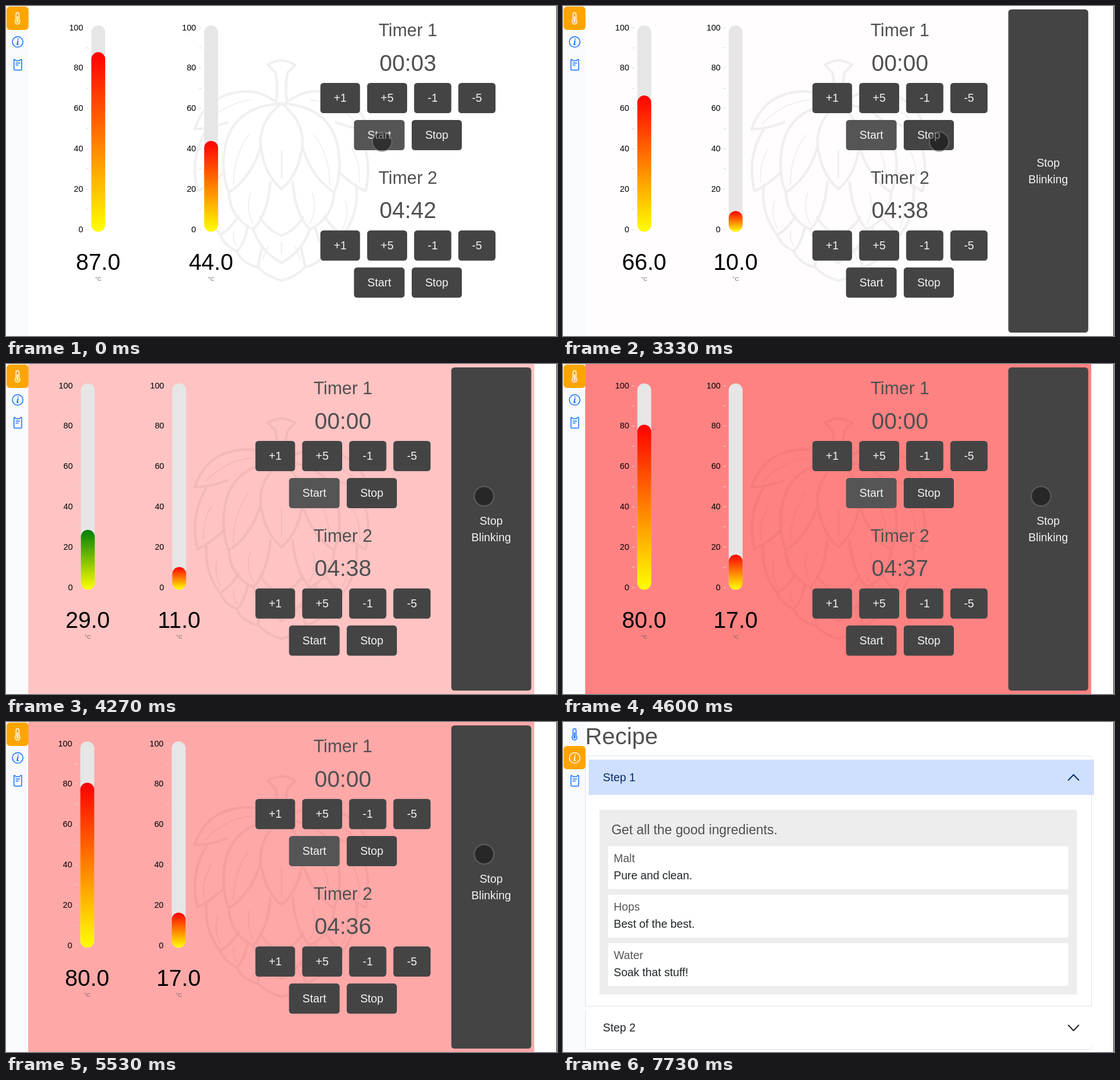
An HTML page for the animation above (8000 ms loop, 967x579 px).

```html
<!DOCTYPE html>
<html lang="en">
<head>
<meta charset="utf-8">
<title>Brewing dashboard</title>
<style>
  html, body { margin: 0; width: 100%; height: 100%; overflow: hidden; background: #fff; }
  svg { display: block; width: 967px; height: 579px; font-family: "Liberation Sans", Arial, sans-serif; }
</style>
</head>
<body>
<svg id="stage" viewBox="0 0 967 579">
  <defs>
    <linearGradient id="hot" x2="0" y2="1"><stop stop-color="#f00"/><stop offset="1" stop-color="#ff0"/></linearGradient>
    <linearGradient id="cool" x2="0" y2="1"><stop stop-color="#008000"/><stop offset="1" stop-color="#ff0"/></linearGradient>
    <g id="hopHalf" fill="none" stroke="#000" stroke-linecap="round" stroke-linejoin="round">
      <g stroke-width="4.5">
        <path d="M483.5 95.500Q471 96 459.500 103.500L473 117Q478 140 474 168"/>
        <path d="M470 166Q445 148 418 150Q352 154 331 216Q360 216 388 204"/>
        <path d="M483.500 171Q400 176 385 245Q376 292 391 327Q430 302 447 247"/>
        <path d="M352 217Q322 265 336 325Q364 311 383 291"/>
        <path d="M483.500 171Q443 202 447 247Q454 297 483.500 321"/>
        <path d="M352 315Q347 365 376 402Q394 391 408 369"/>
        <path d="M391 327Q393 372 434 392Q459 366 464 309"/>
        <path d="M434 392Q446 429 483.500 451"/>
        <path d="M446 371Q458 392 483.500 403"/>
        <path d="M376 402Q384 421 405 430Q417 420 424 389"/>
        <path d="M405 430Q414 452 442 458L449 423"/>
        <path d="M442 458Q458 475 483.500 482"/>
      </g>
      <path stroke-width="2" d="M349 207Q388 168 432 165M347 309Q344 279 360 250M399 313Q399 263 426 226M376 390Q364 366 371 343M434 382Q420 358 429 329M405 421Q397 409 400 395M483.500 302V254M483.500 436V416M451 445Q453 434 461 421"/>
    </g>
  </defs>
  <rect width="967" height="579" fill="#fff"/>
  <g id="dashboard">
    <rect id="flash" x="39" width="888" height="579"/>
    <g id="hop"><use href="#hopHalf"/><use href="#hopHalf" transform="matrix(-1 0 0 1 967 0)"/></g>
    <g id="gauges"></g>
    <g id="timers"></g>
    <g id="alarm"></g>
  </g>
  <g id="recipe"></g>
  <g id="sidebar">
    <rect width="39" height="579" fill="#f8fafd"/>
    <rect id="pill" x="1" width="38.500" height="41" rx="6" fill="#ffa500"/>
    <g fill="none" stroke-width="1.500" stroke-linecap="round" stroke-linejoin="round">
      <g id="thermoIcon">
        <path d="M17.500 24V14.500a2.700 2.700 0 0 1 5.400 0V24a4.300 4.300 0 1 1-5.400 0Z"/>
        <path stroke-width="2" d="M20.200 19v7"/><circle cx="20.200" cy="27" r="1.300"/>
      </g>
      <g id="infoIcon">
        <circle cx="20.500" cy="63" r="9.300"/>
        <path stroke-width="2" d="M20.900 61l-1.300 6.500h1.700M21.200 57.800v.2"/>
      </g>
      <path stroke="#0d6efd" d="M14 94.500q0-1 1-1l2.500 2.500h6l2.500-2.500q1.500 0 1.500 1V111q0 1.500-1.500 1.500H15.500Q14 112.500 14 111ZM17.500 100h6.500M17.500 103.500h4"/>
    </g>
  </g>
  <path d="M966.500 0V579" stroke="#222"/>
  <circle id="cursor" r="17" fill="#000" fill-opacity=".43" stroke="#888" stroke-opacity=".4" stroke-width="2.500"/>
</svg>
<script>
const LOOP = 8000, STEP = 200 / 3;
const ALARM_ON = 3330, ALARM_OFF = 6070, PRESS = 5930, LEAVE = 7330;
const BLUE = '#0d6efd', DARK = '#444', LIT = '#555', INK = '#505050';
const TICKS = [270, 1270, 2200, 3330, 4330, 5330, 6330, 7330];
// time, left value, right value, left fill, right fill
const READINGS = [
  [0, 87, 44, 'hot', 'hot'], [470, 74, 6, 'hot', 'hot'],
  [1470, 71, 8, 'hot', 'hot'], [2470, 66, 10, 'hot', 'hot'],
  [3530, 29, 11, 'cool', 'hot'], [4530, 80, 17, 'hot', 'hot'],
  [5600, 43, 91, 'cool', 'cool'], [6600, 58, 73, 'cool', 'hot']
];
const BLINK = [[3330, 0], [4267, .883], [4933, 1.606], [5533, 2.17], [6000, 2.62]];
const PATH = [[0, 660, 238], [3530, 660, 238], [4130, 839, 232], [6270, 839, 232], [7070, 18, 69]];

const $ = id => document.getElementById(id);

function add(parent, tag, attrs, content) {
  const el = document.createElementNS('http://www.w3.org/2000/svg', tag);
  set(el, attrs);
  if (content) el.textContent = content;
  return parent.appendChild(el);
}
function set(el, attrs) {
  for (const k in attrs) el.setAttribute(k, attrs[k]);
}
const box = (p, x, y, width, height, fill, rx = 0) => add(p, 'rect', { x, y, width, height, fill, rx });
const label = (p, x, y, size, fill, content, anchor = 'middle') =>
  add(p, 'text', { x, y, 'font-size': size, fill, 'text-anchor': anchor }, content);

function makeGauge() {
  const g = add($('gauges'), 'g', {});
  for (let v = 0; v <= 100; v += 10) {
    const y = 391.5 - v * 3.54;
    add(g, 'path', { d: `M-21.500 ${Math.round(y) + .5}h4.500`, stroke: '#d8d8d8' });
    if (v % 20 === 0) label(g, -26.5, y + 5, 14.7, '#000', String(v), 'end');
  }
  box(g, -12.2, 34, 24.4, 362, '#e6e6e6', 12.2);
  const bar = box(g, -12.2, 0, 24.4, 0, '', 12.2);
  const value = label(g, -.2, 462.5, 40, '#000');
  label(g, 0, 481.5, 9.8, '#666', '°C');
  return { g, bar, value };
}

function makeButton(parent, x, y, width, text) {
  const rect = box(parent, x, y, width, 53, DARK, 5.5);
  label(parent, x + width / 2, y + 33, 19.8, '#f4f4f4', text);
  return rect;
}

function makeTimer(name, top) {
  const g = add($('timers'), 'g', { transform: `translate(0 ${top})` });
  label(g, 705.3, 53, 30.8, INK, name);
  const clock = label(g, 705.3, 113.5, 39.8, INK);
  makeButton(g, 551.7, 135, 69.6, '+1');
  makeButton(g, 633.8, 135, 70.2, '+5');
  makeButton(g, 716.2, 135, 65.3, '-1');
  makeButton(g, 793.8, 135, 65.3, '-5');
  const start = makeButton(g, 610.7, 200, 88.8, 'Start');
  makeButton(g, 712, 200, 88, 'Stop');
  return { clock, start };
}

function makeRecipe() {
  const g = $('recipe');
  const line = (d, stroke = '#dee2e6', w = 1) =>
    add(g, 'path', { d, stroke, fill: 'none', 'stroke-width': w, 'stroke-linecap': w > 1 ? 'round' : 'butt', 'stroke-linejoin': 'round' });
  label(g, 39, 38.5, 41, INK, 'Recipe', 'start');
  line('M39.500 498.500V65.500q0-6 6-6H921.500q6 0 6 6V498.500Z');
  line('M39.500 505V574.500H927.500V568');
  box(g, 45, 66, 887, 62, '#cfe0ff');
  label(g, 70, 104, 19.8, '#052c65', 'Step 1', 'start');
  line('M887 102l9-9.500l9 9.500', '#052c65', 2);
  label(g, 70, 543, 19.8, '#212529', 'Step 2', 'start');
  line('M887 532l9 9.500l9-9.500', '#212529', 2);
  box(g, 64, 154, 838, 324, '#ededed');
  label(g, 85, 197, 23.3, INK, 'Get all the good ingredients.', 'start');
  [['Malt', 'Pure and clean.'], ['Hops', 'Best of the best.'], ['Water', 'Soak that stuff!']].forEach(([title, note], i) => {
    const y = 218 + 85 * i;
    box(g, 79, y, 808, 75, '#fff');
    label(g, 89, y + 28, 19.7, '#555', title, 'start');
    label(g, 89, y + 58, 19.7, '#212529', note, 'start');
  });
}

const gauges = [makeGauge(), makeGauge()];
const timers = [makeTimer('Timer 1', 0), makeTimer('Timer 2', 258.8)];
const alarmPanel = box($('alarm'), 781.5, 6, 140.3, 567, DARK, 5.5);
label($('alarm'), 851.5, 282, 19.8, '#f4f4f4', 'Stop');
label($('alarm'), 851.5, 311, 19.8, '#f4f4f4', 'Blinking');
makeRecipe();

const clamp = v => Math.min(1, Math.max(0, v));
const smooth = v => v * v * (3 - 2 * v);
const clockText = s => [Math.floor(s / 60), s % 60].map(n => String(n).padStart(2, '0')).join(':');
const show = (el, on) => set(el, { visibility: on ? 'visible' : 'hidden' });

// Interpolates column `col` of rows that begin with a time.
function along(rows, t, col, ease = v => v) {
  let i = 0;
  while (i < rows.length - 2 && t >= rows[i + 1][0]) i++;
  const [a, b] = [rows[i], rows[i + 1]];
  return a[col] + (b[col] - a[col]) * ease(clamp((t - a[0]) / (b[0] - a[0])));
}

function render(now) {
  const frame = Math.floor((now % LOOP + 4) / STEP);
  const t = frame * STEP + 4;
  const alarm = t >= ALARM_ON && t < ALARM_OFF;

  const phase = along(BLINK, t - 4, 1) % 1;
  const level = alarm ? 1 - Math.abs(1 - 2 * phase) : 0;
  const tint = Math.round(255 * (1 - level));
  set($('flash'), { fill: `rgb(255,${tint},${tint})` });
  set($('hop'), { opacity: .055 * (1 - .7 * level) });
  show($('alarm'), alarm);
  set(alarmPanel, { fill: t >= PRESS ? LIT : DARK });

  const reading = READINGS.filter(r => t >= r[0]).pop();
  // A narrower number lets both columns move right.
  const shift = reading[2] < 10 ? 6 : reading[2] === 11 ? 1 : 0;
  gauges.forEach(({ g, bar, value }, i) => {
    const v = reading[1 + i], height = v * 3.62;
    const x = (alarm ? [142.6, 303] : [161.9, 360])[i] + shift;
    set(g, { transform: `translate(${x} 0)` });
    set(bar, { y: 396 - height, height, rx: Math.min(12.2, height / 2), fill: `url(#${reading[3 + i]})` });
    value.textContent = v.toFixed(1);
  });

  const ticks = TICKS.filter(k => t >= k).length;
  timers[0].clock.textContent = clockText(Math.max(0, 3 - ticks));
  timers[1].clock.textContent = clockText(282 - ticks);
  set(timers[0].start, { fill: t < PRESS ? LIT : DARK });
  set($('timers'), { transform: `translate(${alarm ? -114 : 0} 0)` });

  const left = t >= LEAVE;
  const fade = frame - 109;
  set($('dashboard'), { opacity: clamp(1 - fade / 3) });
  set($('recipe'), { opacity: clamp((fade - 3) / 4) });
  set($('pill'), { y: left ? 42 : 1 });
  set($('thermoIcon'), { stroke: left ? BLUE : '#fff' });
  set($('infoIcon'), { stroke: left ? '#fff' : BLUE });

  set($('cursor'), { cx: along(PATH, t, 1, smooth), cy: along(PATH, t, 2, smooth) });
  show($('cursor'), !left);
}

const begin = performance.now();
function loop() {
  render(performance.now() - begin);
  requestAnimationFrame(loop);
}
loop();
</script>
</body>
</html>
```
